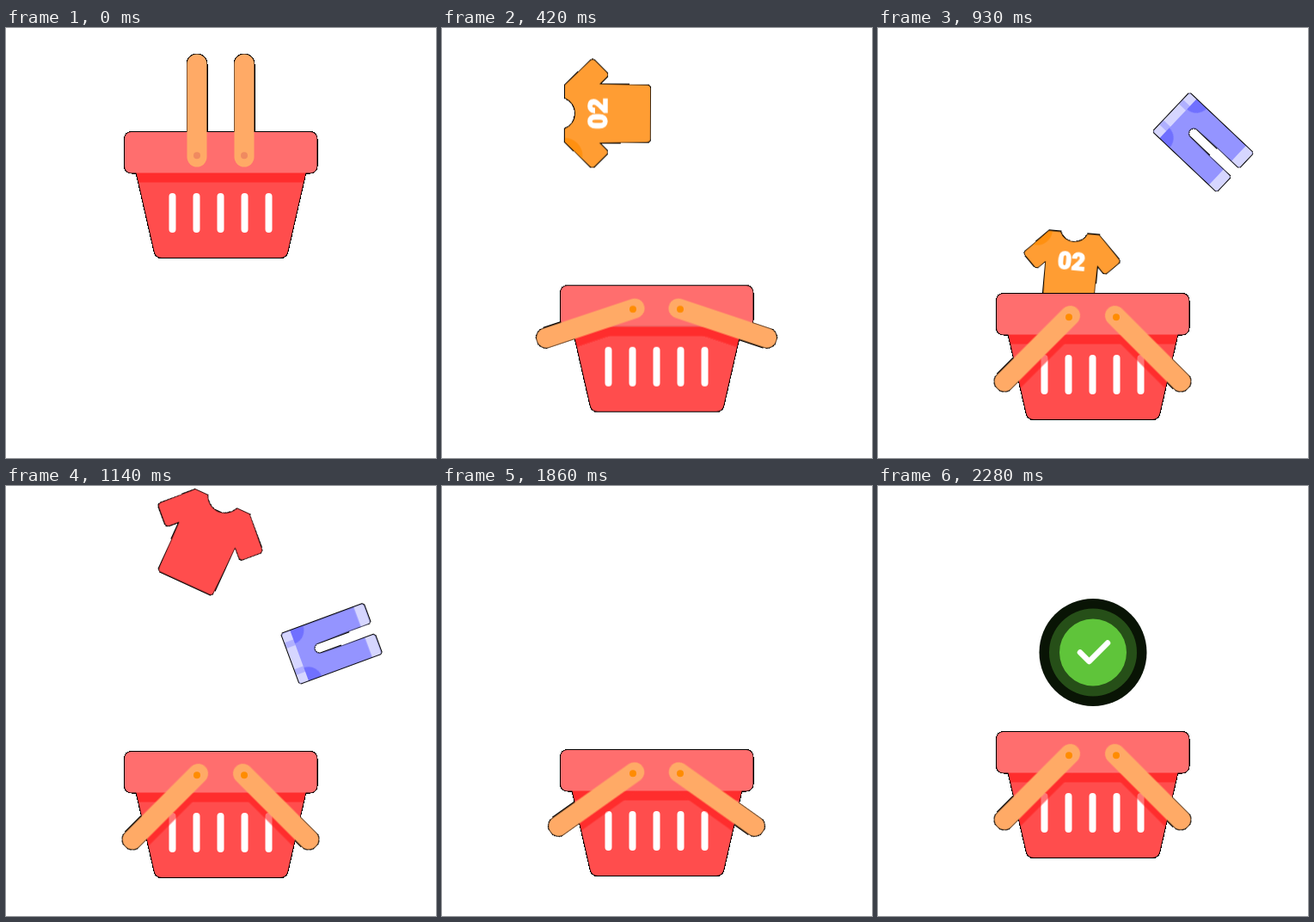
Animation of 500 by 500 pixels, one loop 2.73 s. Source, as an HTML page without scripts:

```html
<!DOCTYPE html>
<html lang="en">
<head>
<meta charset="utf-8">
<title>Shopping basket</title>
<style>
html, body { margin: 0; width: 100%; height: 100%; overflow: hidden; background: #fff; }
svg { display: block; width: 100%; height: 100%; }

/* Crisp line drawn behind the fills, so only its outer half shows */
.outline { stroke: #000; stroke-width: 2; shape-rendering: crispEdges; }
.outline use, .item > .outline { vector-effect: non-scaling-stroke; }
#shirt, #trousers { vector-effect: non-scaling-stroke; }
.number { font: 900 31px Roboto, sans-serif; fill: #fff; stroke: #fff; stroke-width: 1.5; text-anchor: middle; }

/* Everything shares one 2730 ms loop */
.basket, .left, .right, .pivot, .item, .ring {
  animation: 2730ms linear infinite;
}
.basket { animation-name: basket; }
.left, .right { animation-name: swing; }
.left { --side: -1; transform-origin: 222px 148px; }
.right { --side: 1; transform-origin: 277px 148px; }
.pivot { fill: #ff8c00; animation-name: pivot; }
.orange { animation-name: orange; }
.jeans { animation-name: jeans; }
.red { animation-name: red; }
.ring { transform-origin: 250px 193.5px; animation-timing-function: cubic-bezier(.33, 0, .5, 1); }
.inner { animation-name: inner; }
.middle { animation-name: middle; }
.outer { animation-name: outer; }

@keyframes basket {
  0% { transform: translateY(0); animation-timing-function: cubic-bezier(.33, 0, .67, 1); }
  17.8% { transform: translateY(188px); }
  57.5% { transform: translateY(188px); animation-timing-function: cubic-bezier(.3, 0, .6, 1); }
  62.3% { transform: translateY(206px); animation-timing-function: cubic-bezier(.4, 0, .2, 1); }
  79.3%, 100% { transform: translateY(165px); }
}
@keyframes swing {
  0% { transform: rotate(0deg); }
  4.4% { transform: rotate(0deg); animation-timing-function: cubic-bezier(.33, 0, .67, 1); }
  19.78% { transform: rotate(calc(var(--side) * 135deg)); }
  57.5% { transform: rotate(calc(var(--side) * 135deg)); animation-timing-function: cubic-bezier(.33, 0, .67, 1); }
  63% { transform: rotate(calc(var(--side) * 104deg)); animation-timing-function: cubic-bezier(.33, 0, .67, 1); }
  71.2%, 100% { transform: rotate(calc(var(--side) * 135deg)); }
}
@keyframes pivot {
  0% { fill: #f08a60; }
  15%, 100% { fill: #ff8c00; }
}
@keyframes orange {
  0%, 9.89% { transform: translate(186px, 125px) rotate(-115deg) scale(0); }
  15.38% { transform: translate(190px, 99.5px) rotate(-90deg) scale(1); }
  19.78% { transform: translate(192px, 91px) rotate(-70deg) scale(1.15); }
  26.37% { transform: translate(198px, 115px) rotate(-38.7deg) scale(1.17); }
  31.87% { transform: translate(215px, 200px) rotate(-8deg) scale(1.05); }
  36.63% { transform: translate(235px, 370px) rotate(20deg) scale(.7); }
  36.64%, 100% { transform: scale(0); }
}
@keyframes jeans {
  0%, 20.88% { transform: translate(372px, 95px) rotate(62deg) scale(0); }
  26.37% { transform: translate(375px, 101px) rotate(17.7deg) scale(.84); }
  30.77% { transform: translate(377px, 110px) rotate(-19deg) scale(1); }
  41.76% { transform: translate(378px, 183px) rotate(-110deg) scale(1); }
  45.42% { transform: translate(335px, 262px) rotate(-140deg) scale(.85); }
  48.72% { transform: translate(262px, 375px) rotate(-168deg) scale(.65); }
  48.73%, 100% { transform: scale(0); }
}
@keyframes red {
  0%, 36.26% { transform: translate(233px, 85px) rotate(60deg) scale(0); }
  41.76% { transform: translate(231px, 63px) rotate(25deg) scale(1.05); }
  48.9% { transform: translate(228px, 115px) rotate(-45deg) scale(1.1); }
  56.04% { transform: translate(224px, 245px) rotate(-119.5deg) scale(.92); }
  58.24% { transform: translate(236px, 350px) rotate(-142deg) scale(.7); }
  58.25%, 100% { transform: scale(0); }
}
@keyframes inner {
  0%, 69.6% { transform: scale(0); }
  76.2%, 100% { transform: scale(1); }
}
@keyframes middle {
  0%, 72.5% { transform: scale(0); }
  79.1%, 100% { transform: scale(1); }
}
@keyframes outer {
  0%, 76.9% { transform: scale(0); }
  83.5%, 100% { transform: scale(1); }
}
</style>
</head>
<body>
<svg viewBox="0 0 500 500">
  <defs>
    <path id="shirt" d="M-33-47H-18A19.5 19.5 0 0 0 18-47H33L61-18Q64-15 61-12L48 1Q45 4 42 1L34-7 33 48Q33 52 29 52H-29Q-33 52-33 48L-34-7-42 1Q-45 4-48 1L-61-12Q-64-15-61-18Z"/>
    <path id="trousers" d="M-28-50H28Q31-50 31-47V49Q31 52 28 52H10Q7 52 7 49L6-14A6 6 0 0 0-6-14L-7 49Q-7 52-10 52H-28Q-31 52-31 49V-47Q-31-50-28-50Z"/>
    <path id="body" d="M151.500 168H348.500L327.500 260Q326 267 319 267H181Q174 267 172.500 260Z"/>
    <rect id="rim" x="138" y="121" width="223.500" height="47.500" rx="7.500"/>
    <rect id="bar" y="30.500" width="23" height="131" rx="11.500"/>
    <rect id="slot" y="192" width="8" height="46" rx="4"/>
    <clipPath id="shirtClip"><use href="#shirt"/></clipPath>
    <clipPath id="trousersClip"><use href="#trousers"/></clipPath>
    <clipPath id="bodyClip"><use href="#body"/></clipPath>
  </defs>

  <g class="item orange">
    <use href="#shirt" class="outline"/>
    <use href="#shirt" fill="#ff9d33"/>
    <circle cx="-49" cy="-47" r="20.500" fill="#ff9010" clip-path="url(#shirtClip)"/>
    <text class="number" y="1.500">02</text>
  </g>

  <g class="item jeans">
    <use href="#trousers" class="outline"/>
    <use href="#trousers" fill="#9494ff"/>
    <g clip-path="url(#trousersClip)">
      <g fill="#7070ff">
        <circle cx="-31" cy="-39" r="16"/>
        <circle cx="31" cy="-39" r="16"/>
      </g>
      <path fill="#d6d6ff" d="M-32-51H32V-39H-32ZM-32 40H32V53H-32Z"/>
      <path fill="#b0b0ff" d="M-20-51H-13V-39H-20ZM13-51H20V-39H13Z"/>
    </g>
  </g>

  <g class="item red">
    <use href="#shirt" class="outline"/>
    <use href="#shirt" fill="#ff4d4d"/>
  </g>

  <g class="basket">
    <g class="outline">
      <use href="#body"/>
      <use href="#rim"/>
      <g class="left"><use href="#bar" x="210.500"/></g>
      <g class="right"><use href="#bar" x="265.500"/></g>
    </g>
    <use href="#body" fill="#ff4d4d"/>
    <g fill="#fff">
      <use href="#slot" x="189.500"/>
      <use href="#slot" x="217.500"/>
      <use href="#slot" x="245.500"/>
      <use href="#slot" x="273.500"/>
      <use href="#slot" x="301.500"/>
    </g>
    <!-- Shade cast by the rim and handles -->
    <g clip-path="url(#bodyClip)">
      <g fill="#ff1a1a" opacity=".6">
        <rect x="140" y="168" width="220" height="11.500"/>
        <g transform="translate(0 10)">
          <g class="left"><use href="#bar" x="210.500"/></g>
          <g class="right"><use href="#bar" x="265.500"/></g>
        </g>
      </g>
    </g>
    <use href="#rim" fill="#ff6e6e"/>
    <g fill="#fa6">
      <g class="left"><use href="#bar" x="210.500"/></g>
      <g class="right"><use href="#bar" x="265.500"/></g>
    </g>
    <circle class="pivot" cx="222" cy="148.300" r="4"/>
    <circle class="pivot" cx="277" cy="148.300" r="4"/>
  </g>

  <circle class="ring outer" cx="250" cy="193.500" r="62.500" fill="#091405"/>
  <circle class="ring middle" cx="250" cy="193.500" r="51" fill="#264f18"/>
  <g class="ring inner">
    <circle cx="250" cy="193.500" r="39" fill="#5fc43a"/>
    <path d="M235 193.500L245.500 204 267 182.500" fill="none" stroke="#fff" stroke-width="6.500" stroke-linecap="round" stroke-linejoin="round"/>
  </g>
</svg>
</body>
</html>
```
